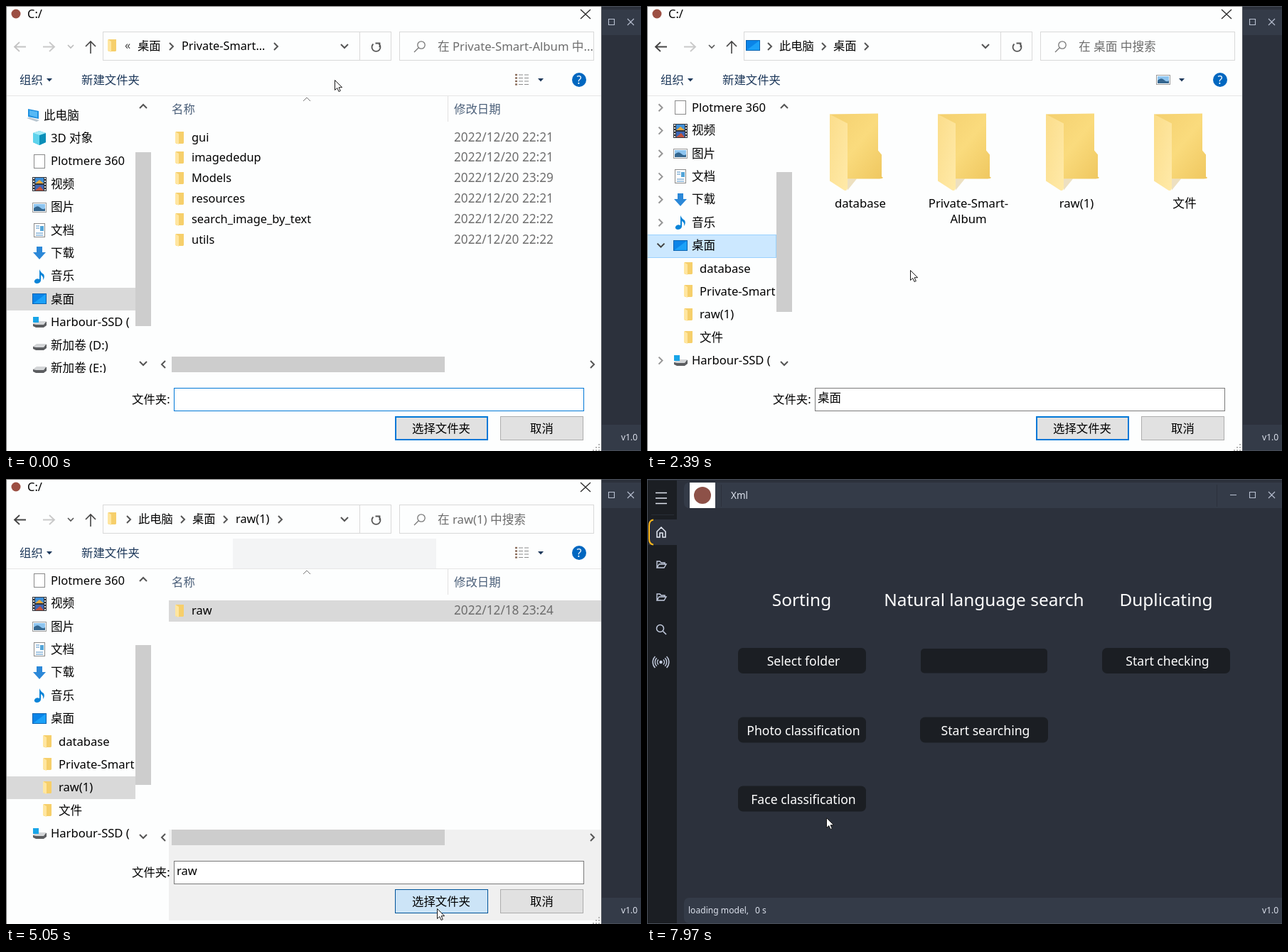
Write an HTML page that moves like this. It is 893 px wide and 627 px high and loops after 8 s.

```html
<!DOCTYPE html>
<html lang="zh-CN">
<head>
<meta charset="utf-8">
<style>
html, body { margin: 0; width: 893px; height: 627px; overflow: hidden; background: #2c313c; }
svg { display: block; font-family: "Noto Sans", "Noto Sans CJK SC", "Noto Sans CJK", sans-serif; }
text { font-variant-ligatures: none; white-space: pre; }
</style>
</head>
<body>
<svg id="stage" width="893" height="627" viewBox="0 0 893 627"></svg>
<script>
const LOOP = 8000;
const CLOSE = 5170;
const stage = document.getElementById('stage');

const ticks = [[0, 1], [140, 8], [1120, 2], [1390, 2], [1760, 2], [2030, 8], [3020, 2], [3280, 3],
  [3670, 2], [3940, 6], [4690, 7], [5560, 7], [6400, 2], [7310, 1], [7850, 2]]
  .flatMap(([start, n]) => Array.from({ length: n }, (_, i) => start + 120 * i));

// Pointer path: [time, x, y]
const path = [[0, 462, 104], [140, 452, 108], [380, 345, 148], [620, 239, 175], [860, 190, 236], [980, 168, 275],
  [1240, 150, 350], [1510, 142, 408], [2030, 142, 408], [2390, 370, 372], [2750, 618, 247], [3520, 624, 250],
  [3670, 627, 249], [3790, 627, 249], [4300, 352, 190], [4540, 345, 188], [4690, 400, 290], [5050, 606, 605],
  [5170, 606, 605], [5410, 582, 542], [5680, 455, 440], [5920, 312, 352], [6040, 297, 352], [6280, 262, 345],
  [6400, 255, 398], [6520, 250, 446], [7310, 250, 448], [7850, 251, 460], [7970, 252, 477]];

function pointerAt(t) {
  const next = path.findIndex(p => p[0] > t);
  if (next < 0) return path[path.length - 1].slice(1);
  const a = path[next - 1], b = path[next], k = (t - a[0]) / (b[0] - a[0]);
  return [1, 2].map(i => Math.round(a[i] + (b[i] - a[i]) * k));
}

const between = (t, a, b) => t >= a && t < b;
const box = (x, y, w, h, fill, extra = '') =>
  `<rect x="${x}" y="${y}" width="${w}" height="${h}" fill="${fill}" ${extra}/>`;
const frame = (x, y, w, h, fill, stroke, sw = 1) =>
  box(x + sw / 2, y + sw / 2, w - sw, h - sw, fill, `stroke="${stroke}" stroke-width="${sw}"`);
const line = (d, color, w = 1, extra = '') =>
  `<path d="${d}" fill="none" stroke="${color}" stroke-width="${w}" ${extra}/>`;
const shape = (d, fill, extra = '') => `<path d="${d}" fill="${fill}" ${extra}/>`;
const dot = (x, y, r, fill) => `<circle cx="${x}" cy="${y}" r="${r}" fill="${fill}"/>`;
const at = (x, y, s) => `<g transform="translate(${x} ${y})">${s}</g>`;
const text = (x, y, s, fill = '#000', size = 16.6, anchor = 'start') =>
  `<text x="${x}" y="${y}" fill="${fill}" font-size="${size}" text-anchor="${anchor}">${s}</text>`;

const CHEVRONS = { right: 'M-3-5L2 0L-3 5', left: 'M3-5L-2 0L3 5', up: 'M-5 3L0-2L5 3', down: 'M-5-3L0 2L5-3' };
const chevron = (x, y, dir, color = '#555', w = 2) => at(x, y, line(CHEVRONS[dir], color, w));

// Icons, each centred on the origin
const monitor = box(-10, -8, 20, 15, '#0a84e8') + shape('M-10 7L10-8V7Z', '#1ba1f8') +
  frame(-10, -8, 20, 15, 'none', '#0b63b0');
const folder = shape('M-5-9H6V7L5 8H-5Z', '#f6cf6b') + shape('M-6-9L-1-6V9L-6 7Z', '#ffe6a0');
const page = frame(-8, -10, 16, 20, '#fff', '#8a8a8a');
const picture = frame(-10, -7, 20, 14, '#fff', '#999') + box(-8, -5, 16, 10, '#8ec5f0') +
  shape('M-8 1Q-3-4 1 0T8 1V5H-8Z', '#34668f');
const drive = shape('M-9 2L-4-1H10V4L6 7H-5L-9 5Z', '#5b5d60') + shape('M-9 2L-4-2H10L6 3H-5Z', '#d3d5d7');
const icons = {
  pc: shape('M-7-9L8-6V5L-7 2Z', '#1e90e0') + shape('M-5-7L6-5V3L-5 0Z', '#56b9f5') +
    shape('M-9 4L-5 3L9 7L5 9Z', '#b9c6d0'),
  cube: shape('M0-10L9-7V6L0 10L-9 6V-7Z', '#27b4d8') + shape('M-9-7L0-4V10L-9 6Z', '#5ed3ec') +
    shape('M0-4L9-7V6L0 10Z', '#0b8fb8') + shape('M0-10L9-7L0-4L-9-7Z', '#a5ebf7'),
  page,
  film: box(-10, -10, 20, 20, '#33373d') + box(-6, -9, 12, 8, '#3f8fd8') + box(-6, 1, 12, 8, '#3d66b5') +
    shape('M-6-1L0-6L6-1Z', '#e8a93c') + shape('M-6 9L1 3L6 9Z', '#c5533b') +
    line('M-8-9V10M8-9V10', '#ddd', 2, 'stroke-dasharray="2 2"'),
  picture,
  doc: page + line('M-5-6H0M-5-3H0M-5 4H5M-5 7H5', '#4a8fc7') + box(1, -6, 5, 7, '#53a5d8'),
  down: shape('M-4-9H4V-1H9L0 9L-9-1H-4Z', '#2b88d8'),
  note: shape('M0-10Q2-5 6-3Q8 1 5 5Q6 0 2-2V6Q1 10-4 10Q-8 9-7 6Q-5 2 0 4Z', '#0a84d8'),
  monitor,
  system: drive + box(-9, -8, 8, 8, '#18a5e8'),
  drive,
  folder
};
const icon = (name, x, y) => at(x, y, icons[name]);

const bigFolder = shape('M0 1L68 0V52L73 58V89Q78 91 70 92H0Z', 'url(#fold)') +
  shape('M25 92L38 92L25 108Z', '#cfa94e', 'opacity=".35"') +
  shape('M0 1L25 14V105Q24 110 20 108L0 95Z', 'url(#flap)');
const defs = `<defs><linearGradient id="fold" x2="1" y2="1"><stop stop-color="#f4d06f"/>
  <stop offset=".5" stop-color="#fadb7d"/><stop offset="1" stop-color="#efc75f"/></linearGradient>
  <linearGradient id="flap" x2="1" y2="1"><stop stop-color="#fbdd8a"/><stop offset="1" stop-color="#ffeaa9"/></linearGradient>
  <clipPath id="tree"><rect x="1" y="128" width="181" height="389"/></clipPath></defs>`;

/* ---------- main window ---------- */
function appWindow(t, [px, py]) {
  const bar = '#343b48', dark = '#1b1e23', ink = '#c3ccdf';
  const over = (x, y) => t >= CLOSE && px >= x && px < x + 180 && py >= y && py < y + 36;
  const button = (x, y, label) =>
    box(x, y, 180, 36, over(x, y) ? '#ffb000' : dark, 'rx="7"') + text(x + 92, y + 25, label, '#fff', 17.6, 'middle');
  const heading = (x, s) => text(x, 179, s, '#fff', 24.4, 'middle');
  const openFolder = line('M-6 4V-5H-2L0-3H5V-1M-6 4L-3-1H7L4 4Z', ink, 1.4);
  const wave = r => `M${-r * .7} ${-r * .7}A${r} ${r} 0 0 0 ${-r * .7} ${r * .7}M${r * .7} ${-r * .7}A${r} ${r} 0 0 1 ${r * .7} ${r * .7}`;
  let s = box(0, 0, 893, 627, '#2c313c') +
    box(1, 2, 41, 625, dark) + shape('M2 93V66Q2 57 11 57H42V93Z', '#2c313c') +
    line('M9 57.5Q3 58 3 66V84Q3 92 9 92.5', '#ffb81c', 2) +
    line('M6 50.5H38', '#282d36') + line('M12 19.5H28M12 27H28M12 34.5H28', '#dfe4ee', 1.5) +
    at(20, 75, line('M-6 7V-1L0-7L6-1V7H2V1H-2V7Z', '#e6ebf5', 1.5)) +
    at(20, 121, openFolder) + at(20, 167, openFolder) +
    at(19, 211, line('M3.5 3.5L8 8', ink, 1.6) + `<circle r="5" cx="-.5" cy="-.5" fill="none" stroke="${ink}" stroke-width="1.5"/>`) +
    at(19.5, 258, dot(0, 0, 2.2, ink) + line(wave(5) + wave(8.3) + wave(11.5), ink, 1.5));
  s += box(52, 5, 850, 36, bar, 'rx="7"') + box(52, 590, 850, 36, bar, 'rx="7"') +
    box(60, 5, 36, 36, '#fff') + dot(78, 23, 12, '#8d5148') +
    line('M104.5 8V39M801.5 8V39', '#2c313c') + text(118, 28, 'Xml', '#dce1ec', 13.5) +
    line('M820 22.5H829M847.5 18.5H855.5V26.5H847.5ZM874 18L883 27M883 18L874 27', '#b9c1d1', 1.1);
  s += heading(217.5, 'Sorting') + heading(474, 'Natural language search') + heading(730, 'Duplicating') +
    button(128, 238, 'Select folder') + button(128, 335.5, 'Photo classification') +
    button(128, 432.5, 'Face classification') + box(385, 239, 178, 34.5, dark, 'rx="5"') +
    button(384, 335.5, 'Start searching') + button(640, 238, 'Start checking');
  const status = (x, v) => text(x, 612, v, '#dce1ec', 12.1);
  if (t >= 7310) s += status(58, 'loading model,') + status(152, '0 s');
  else if (t >= CLOSE) s += status(58, 'Select folder:') + status(139, 'C:/Users/Dorbek/Desktop/raw(1)/raw');
  s += status(865, 'v1.0') + line('M0 .5H893M.5 0V627M0 626.5H893', '#4b505a');
  return s;
}

/* ---------- folder dialog ---------- */
const places = [['pc', '此电脑'], ['cube', '3D 对象'], ['page', 'Plotmere 360'], ['film', '视频'], ['picture', '图片'],
  ['doc', '文档'], ['down', '下载'], ['note', '音乐'], ['monitor', '桌面']];
const children = ['database', 'Private-Smart', 'raw(1)', '文件'].map(n => ['folder', n, true]);
const disks = [['system', 'Harbour-SSD ('], ['drive', '新加卷 (D:)'], ['drive', '新加卷 (E:)']];

function tree(t) {
  const open = t >= 2030;
  const rows = open ? [...places, ...children, ...disks] : [...places, ...disks];
  const selected = t < 3790 ? 8 : 11, focused = between(t, 1390, 2750);
  const fade = t < 860 || t >= 3790 ? 0 : t < 1390 ? (t - 740) / 650 : t < 2870 ? 1 : Math.max(.08, (3520 - t) / 700);
  let s = '';
  rows.forEach(([kind, name, child], i) => {
    const y = 154 + 32.4 * i - (open ? 75.6 : 0);
    if (i === selected) {
      const top = Math.round(y - 16);
      s += focused ? frame(0, top, 182, 33, '#cce8ff', '#99d1ff') : box(1, top, 181, 32, '#d9d9d9');
    }
    if (fade && !child) {
      const down = i === 0 || (open && i === 8);
      s += `<g opacity="${fade}">${chevron(i ? 19.5 : 9, y, down ? 'down' : 'right', down ? '#404040' : '#969696')}</g>`;
    }
    s += icon(kind, child ? 58 : i ? 47 : 38, Math.round(y)) + text(child ? 74 : i ? 63 : 53, Math.round(y + 5.5), name);
  });
  const thumb = between(t, 860, 980) ? '#a6a6a6' : '#cdcdcd';
  return `<g clip-path="url(#tree)">${s}</g>` + chevron(193, 141, 'up') + chevron(193, 504, 'down') +
    (open ? box(182, 234, 22, 197, thumb) : box(182, 206, 22, 245, thumb));
}

function listView(t, rows, active, color) {
  let s = chevron(423, 131, 'up', '#777', 1) + text(233, 151, '名称', '#4c607a', 16.4) +
    text(630, 151, '修改日期', '#4c607a', 16.4) + line('M621.5 127V163', '#e2e2e2');
  rows.forEach(([name, date], i) => {
    const y = 185.5 + 28.8 * i, baseline = Math.round(y + 5);
    if (i === active) s += box(229, y - 14.5, 608, 30, color);
    s += icon('folder', 244, Math.round(y)) + text(261, baseline, name, '#000', 16.4) + text(630, baseline, date, '#6d6d6d', 17.2);
  });
  return s + box(233, 494, 384, 22, '#cdcdcd') + chevron(221, 505, 'left') + chevron(825, 505, 'right');
}

const albumRows = [['gui', '21'], ['imagededup', '21'], ['Models', '29', 23], ['resources', '21'],
  ['search_image_by_text', '22'], ['utils', '22']].map(([n, min, h = 22]) => [n, `2022/12/20 ${h}:${min}`]);

function iconView(t) {
  const names = [['database'], ['Private-Smart-', 'Album'], ['raw(1)'], ['文件']];
  return names.map((lines, i) => {
    const x = 300 + 152 * i;
    return (i === 2 && t >= 2750 ? frame(532, 135, 143, 159, '#cce8ff', '#99d1ff') : '') +
      at(x - 43, 151.5, bigFolder) + lines.map((l, k) => text(x, 284 + 22 * k, l, '#000', 16.7, 'middle')).join('');
  }).join('');
}

function addressBar(t, view) {
  const gray = '#555', back = view === 'album' ? '#c4c4c4' : '#444';
  let s = line('M28 57.5H12M19 51L12 57.5L19 64', back, 1.8) + line('M52 57.5H68M61 51L68 57.5L61 64', '#c9c9c9', 1.8) +
    at(91, 57, line('M-4-2L0 2L4-2', view === 'album' ? '#bbb' : '#555', 1.6)) +
    line('M119 67V50M112 57L119 50L126 57', '#444', 1.6) +
    frame(136, 36, 362, 41, 'none', '#d9d9d9') + frame(497, 36, 45, 41, 'none', '#d9d9d9') +
    frame(553, 36, 274, 41, 'none', '#d9d9d9') + chevron(476, 57, 'down', gray) +
    line('M516.5 53.5A6 6 0 1 0 524.5 53.5M519.5 52.5H525.5V58', gray, 1.8) +
    line('M580 59L574 65', '#777', 1.3) + '<circle cx="584" cy="55" r="5.2" fill="none" stroke="#777" stroke-width="1.3"/>';
  const crumb = (x, name) => text(x, 62, name, '#000', 16.3);
  const arrow = x => chevron(x, 57, 'right', gray);
  if (view === 'album') {
    s += icon('folder', 149, 56) + text(167, 61, '«', '#444', 16) + crumb(185, '桌面') + arrow(233) +
      crumb(247, 'Private-Smart...') + arrow(380);
  } else {
    s += icon(view === 'raw' ? 'folder' : 'monitor', 149, 56) + arrow(173) + crumb(186, '此电脑') + arrow(249) + crumb(262, '桌面');
    if (t >= 2030) s += arrow(309);
    if (view === 'raw') s += crumb(323, 'raw(1)') + arrow(386);
  }
  const query = { album: '在 Private-Smart-Album 中...', raw: '在 raw(1) 中搜索' }[view] || '在 桌面 中搜索';
  return s + text(607, 63, query, '#6d6d6d', 16.7);
}

function toolbar(details) {
  const navy = '#1e395b', triangle = x => shape(`M${x} 102H${x + 8}L${x + 4} 106.5Z`, navy);
  const rows = [97, 101.5, 106, 110.5].map(y => line(`M716 ${y}H719`, '#8a6d5b', 2.4) + line(`M721 ${y}H727M729 ${y}H735`, '#8b8b8b', 1.2)).join('');
  return text(19, 110, '组织', navy, 16.4) + triangle(57) + text(106, 110, '新建文件夹', navy, 16.4) +
    (details ? rows : icon('picture', 726, 104)) + triangle(748) + dot(806, 104, 10, '#0067c0') +
    text(806, 110, '?', '#fff', 16, 'middle') + line('M1 126.5H837', '#e6e6e6');
}

function dialog(t) {
  const view = t < 1760 ? 'album' : t < 1880 ? 'busy' : t < 3790 ? 'desktop' : 'raw';
  const details = view === 'album' || view === 'raw', panel = '#f0f0f0', strip = '#f3f4f5';
  let s = box(0, 0, 838, 627, '#fdfefe');
  if (between(t, 380, 1760)) s += box(210, 84, 412, 42, strip) + box(210, 494, 627, 68, panel);
  if (between(t, 3280, 3790)) s += box(659, 516, 15, 22, panel);
  if (t >= 3940) s += box(319, 84, 286, 42, strip) + box(229, 494, 608, 128, panel);
  s += dot(14, 11, 6.5, '#9c4f43') + text(30, 17, 'C:/', '#000', 16.5) + line('M808 5L822 18M822 5L808 18', '#222', 1.2);
  s += addressBar(t, view) + toolbar(details) + tree(t);
  if (view === 'album') s += listView(t, albumRows, between(t, 500, 860) ? 0 : -1, '#e5f3ff');
  if (view === 'busy') s += text(523, 164, '正在处理...', '#6d6d6d', 16.4, 'middle');
  if (view === 'desktop') s += iconView(t);
  if (view === 'raw') {
    const color = t < 4420 ? '#e5f3ff' : t < 5050 ? '#cce8ff' : '#d9d9d9';
    s += listView(t, [['raw', '2022/12/18 23:24']], t >= 4180 ? 0 : -1, color);
  }
  const value = t < 1760 ? '' : t < 2750 ? '桌面' : t < 4420 ? 'raw(1)' : 'raw';
  const hot = t >= 5050;
  s += text(177, 560, '文件夹:', '#000', 16.4) + frame(236, 538, 577, 33, '#fff', t < 1760 ? '#0078d7' : '#7a7a7a') +
    text(240, 558, value, '#000', 16.5);
  if (between(t, 500, 980) || between(t, 1390, 1760)) s += box(240, 541, 1, 22, '#000');
  s += frame(547, 578, 131, 34, hot ? '#cce4f7' : '#e1e1e1', hot ? '#005499' : '#0078d7', hot ? 1 : 2) +
    frame(695, 578, 117, 34, '#e1e1e1', '#adadad') + text(612, 601, '选择文件夹', '#000', 16.4, 'middle') +
    text(753.5, 601, '取消', '#000', 16.4, 'middle');
  for (let i = 0; i < 6; i++) {
    const col = i < 3 ? 2 : i < 5 ? 1 : 0, row = i < 3 ? i : i < 5 ? i - 2 : 2;
    s += box(825 + 4 * col, 617 + 4 * row, 2, 2, '#b5b5b5');
  }
  return s + line('M0 .5H838M.5 0V627', '#777') + line('M837.5 0V627', '#4b4f57');
}

const arrowPointer = shape('M.5.5V14.5L3.8 11.5L6 16.5L8.3 15.5L6.1 10.7H10.6Z', '#fff', 'stroke="#1a1a1a"');
const handPointer = shape('M0 1Q1.5-1 3 1V7L4 6L6 7L8 7L10 8L12 9V14L10 18H3L-1 13L-4 10Q-4 8-2 9L0 11Z', '#fff', 'stroke="#1a1a1a"');

function scene(t) {
  const p = pointerAt(t), [x, y] = p;
  const onButton = t >= CLOSE && x > 128 && x < 308 && (between(y, 335.5, 371.5) || between(y, 432.5, 468.5));
  return defs + appWindow(t, p) + (t < CLOSE ? dialog(t) : '') + at(x, y, onButton ? handPointer : arrowPointer);
}

let shown = -1;
function update(now) {
  const t = now % LOOP;
  const tick = ticks.filter(v => v <= t).pop();
  if (tick !== shown) {
    stage.innerHTML = scene(tick);
    shown = tick;
  }
  requestAnimationFrame(() => update(performance.now() - start));
}
const start = performance.now();
update(0);
</script>
</body>
</html>
```
